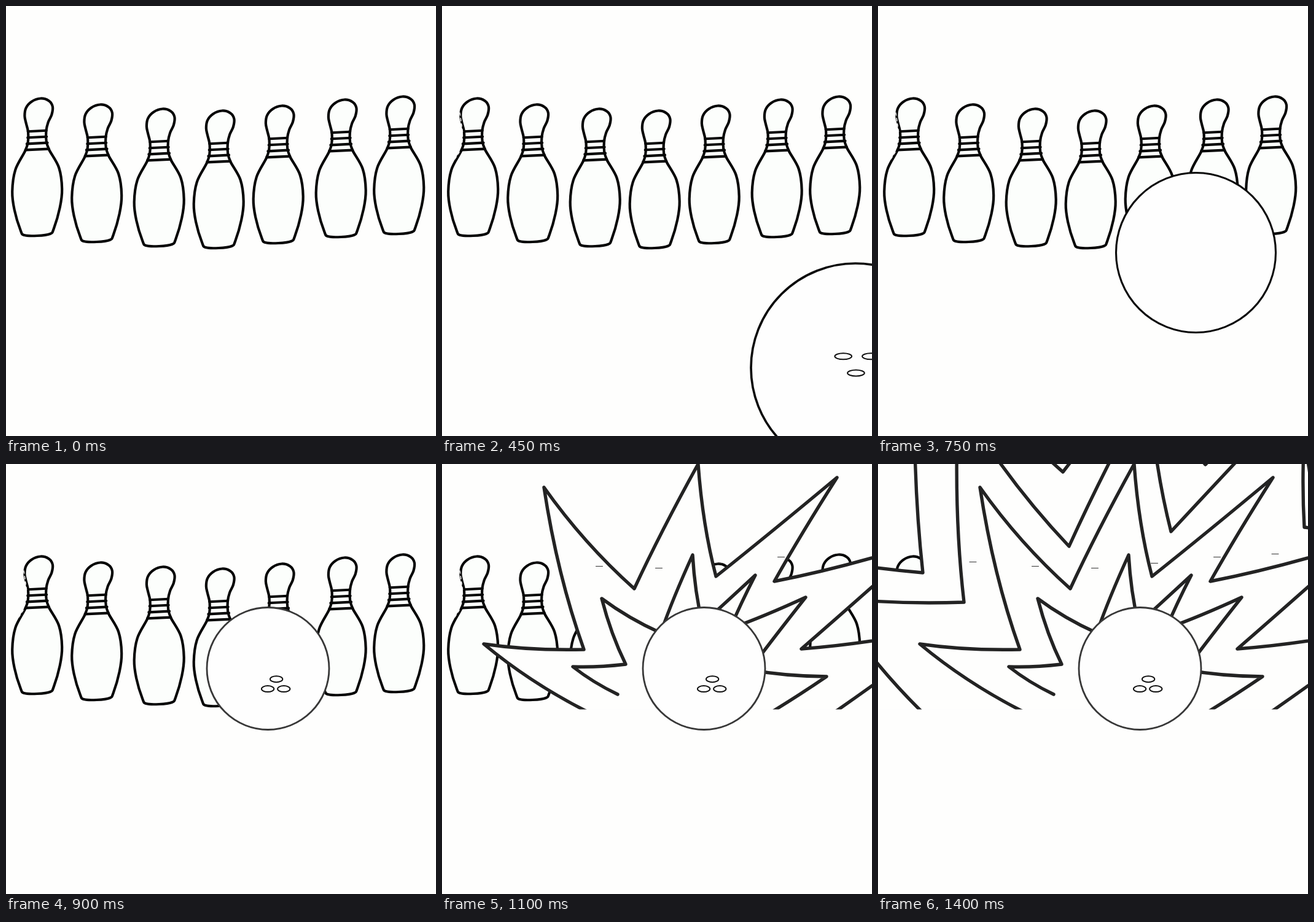
An HTML page with a canvas for the animation above (1500 ms loop, 700 by 700 pixels).

```html
<!DOCTYPE html>
<html lang="en">
<head>
<meta charset="utf-8">
<title>Bowling strike</title>
<style>
html, body { margin: 0; width: 100%; height: 100%; overflow: hidden; background: #fefefd; }
canvas { display: block; }
</style>
</head>
<body>
<canvas id="stage" width="700" height="700"></canvas>
<script>
const ctx = document.getElementById('stage').getContext('2d');
const LOOP = 1500;
const PAPER = '#fefefd';
const FLOOR = 399;

// Half width of a pin at a few heights, crown to base
const PROFILE = [
  [150.5, 0], [155, 14], [165, 21.7], [178, 22], [190, 18], [204, 14.7], [221, 15],
  [235, 19.5], [265, 35.5], [300, 40.5], [330, 37], [364, 27], [372, 21], [374, 0]
];
const PINS = [[0, 0], [97, 10], [198.5, 17], [295.5, 20], [392.5, 12], [494.5, 2], [589, -3]];

// Ball poses: x, y, radius and, where the holes face us, their centre and direction
const BALL_START = 300, BALL_STEP = 150;
const BALLS = [
  { x: 713, y: 745, r: 186 },
  { x: 673, y: 589, r: 170, holes: [2, -10, 1] },
  { x: 614.5, y: 484, r: 156, holes: [1, -121, 1] },
  { x: 517.5, y: 401.5, r: 130 },
  { x: 426.5, y: 333, r: 99.5, holes: [13, 28, -1] }
];

// Tips and valleys of each burst, left to right
const BURST_START = 1000, BURST_STEP = 100;
const BURSTS = [
  [[286, 375], [213, 330], [299, 326], [260, 219], [356, 275], [408, 148], [424, 260],
   [510, 181], [469, 268], [592, 217], [501, 335], [626, 346], [541, 401]],
  [[234, 402], [68, 293], [231, 302], [166, 38], [313, 203], [417, 0], [446, 183],
   [643, 22], [541, 191], [780, 129], [585, 301], [832, 264], [642, 402]],
  [[70, 402], [-80, 216], [140, 225], [131, -105], [311, 134], [441, -125], [477, 110],
   [700, -128], [694, 103], [790, 106], [790, 402]],
  [[-50, 402], [-200, 130], [73, 177], [64, -250], [301, 13], [430, -150], [533, 1],
   [680, -160], [790, 402]]
];

function line(x1, y1, x2, y2) {
  ctx.beginPath();
  ctx.moveTo(x1, y1);
  ctx.lineTo(x2, y2);
  ctx.stroke();
}

// Place a point of the pin: the head leans right, level lines rise slightly
function pinPoint(y, side) {
  return [50.7 + Math.max(0, 190 - y) * 0.14 + side, y - side * 0.05];
}

// Closed smooth curve through all points
function smoothPath(p) {
  const get = i => p[(i + p.length) % p.length];
  const path = new Path2D();
  path.moveTo(...p[0]);
  p.forEach((b, i) => {
    const a = get(i - 1), c = get(i + 1), d = get(i + 2);
    path.bezierCurveTo(
      b[0] + (c[0] - a[0]) / 6, b[1] + (c[1] - a[1]) / 6,
      c[0] - (d[0] - b[0]) / 6, c[1] - (d[1] - b[1]) / 6, ...c);
  });
  return path;
}

const pinShape = smoothPath([
  ...PROFILE.map(([y, w]) => pinPoint(y, w)),
  ...PROFILE.slice(1, -1).reverse().map(([y, w]) => pinPoint(y, -w))
]);

function drawPin([dx, dy]) {
  ctx.save();
  ctx.translate(dx, dy);
  ctx.strokeStyle = '#050505';
  ctx.fillStyle = '#fcfefc';
  ctx.lineWidth = 4.2;
  ctx.fill(pinShape);
  ctx.stroke(pinShape);
  for (let i = 0; i < 4; i++) {
    const y = 203.5 + i * 10, w = 15 + i * i * 0.45;
    line(...pinPoint(y, -w), ...pinPoint(y, w));
  }
  ctx.restore();
}

// Worn spots on the first pin
function drawScuffs() {
  ctx.strokeStyle = '#f4f4f4';
  ctx.lineWidth = 1.6;
  ctx.setLineDash([4, 5]);
  line(29, 174, 34, 208);
  line(21, 249, 28, 238);
  ctx.setLineDash([]);
}

// Hand-drawn edges: every side bows a little down and left
function burstPath(pts) {
  const path = new Path2D();
  path.moveTo(...pts[0]);
  for (let i = 1; i < pts.length; i++) {
    const [x0, y0] = pts[i - 1], [x, y] = pts[i];
    const bow = Math.hypot(x - x0, y - y0) * 0.04;
    path.quadraticCurveTo((x0 + x) / 2 - bow, (y0 + y) / 2 + bow, x, y);
  }
  return path;
}

function drawBurst(pts) {
  const edge = burstPath(pts);
  const area = new Path2D(edge);
  area.lineTo(pts[0][0], FLOOR + 3);
  ctx.save();
  ctx.beginPath();
  ctx.rect(0, 0, 700, FLOOR + 0.5);
  ctx.clip();
  ctx.fillStyle = PAPER;
  ctx.fill(area);
  ctx.strokeStyle = '#232323';
  ctx.lineWidth = 5.4;
  ctx.stroke(edge);
  ctx.restore();
}

// Thin remains of the pin crowns
function drawTraces() {
  ctx.strokeStyle = '#333';
  ctx.lineWidth = 1;
  for (const [x, y] of PINS.slice(1)) line(x + 52, y + 149.5, x + 63, y + 149.5);
}

function drawHoles(r, [cx, cy, dir]) {
  const s = dir * r / 156;
  ctx.strokeStyle = '#111';
  ctx.lineWidth = 2;
  for (const [x, y] of [[-20, -8], [21, -8], [-1, 17]]) {
    ctx.beginPath();
    ctx.ellipse(cx + x * s, cy + y * s, 5 + r * 0.052, 5, 0, 0, Math.PI * 2);
    ctx.stroke();
  }
}

function drawBall(step) {
  const { x, y, r, holes } = BALLS[step];
  ctx.save();
  ctx.translate(x, y);
  ctx.fillStyle = '#fefefe';
  ctx.strokeStyle = step % 4 ? '#0a0a0a' : '#383838';
  ctx.lineWidth = 4 - step * 0.3;
  ctx.beginPath();
  ctx.arc(0, 0, r, 0, Math.PI * 2);
  ctx.fill();
  ctx.stroke();
  if (holes) drawHoles(r, holes);
  ctx.restore();
}

function draw(t) {
  const ball = Math.min(BALLS.length - 1, Math.floor((t - BALL_START) / BALL_STEP));
  const bursts = Math.max(0, Math.floor((t - BURST_START) / BURST_STEP) + 1);
  ctx.fillStyle = PAPER;
  ctx.fillRect(0, 0, 700, 700);
  ctx.lineCap = ctx.lineJoin = 'round';
  PINS.forEach(drawPin);
  if (ball >= 0) drawScuffs();
  BURSTS.slice(0, bursts).reverse().forEach(drawBurst);
  if (bursts > 1) drawTraces();
  if (ball >= 0) drawBall(ball);
}

const start = performance.now();
function tick() {
  draw((performance.now() - start) % LOOP);
  requestAnimationFrame(tick);
}
tick();
</script>
</body>
</html>
```
